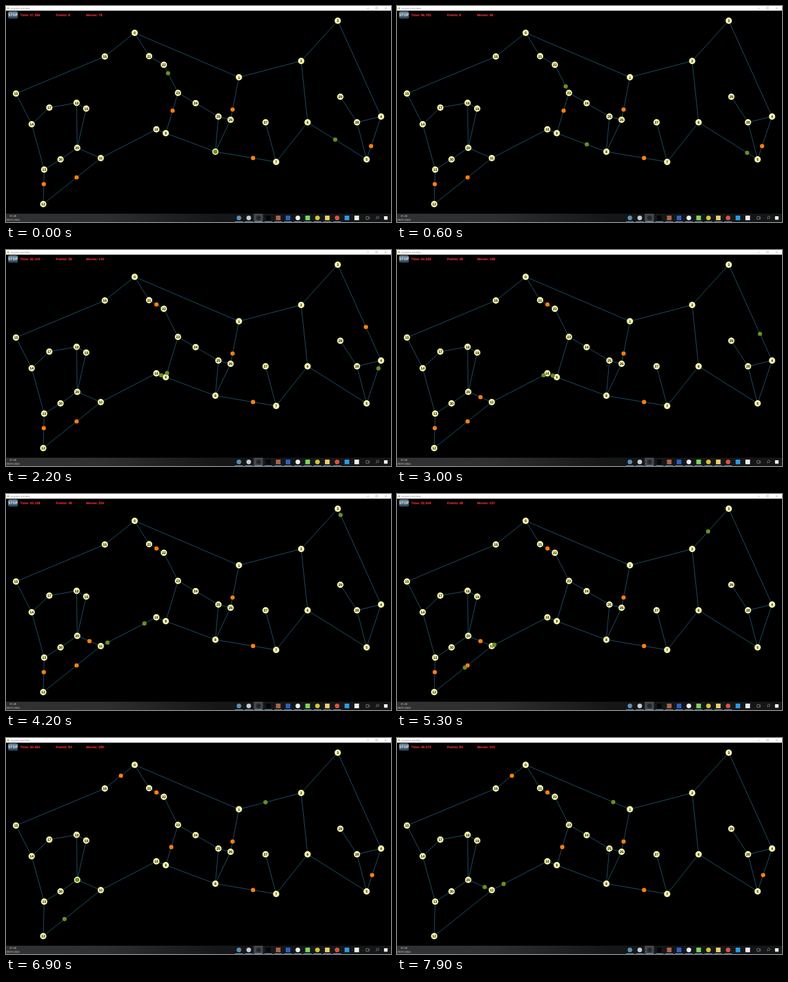
An HTML page that plays this animation: 600x338 px, repeating every 8 s.

```html
<!DOCTYPE html>
<html lang="en">
<head>
<meta charset="utf-8">
<title>Graph game</title>
<style>
  html, body { margin: 0; width: 100%; height: 100%; overflow: hidden; background: #000; }
  svg { display: block; width: 600px; height: 338px; }
  text { text-rendering: geometricPrecision; font-family: Arial, "Liberation Sans", sans-serif; }
  .edge { stroke: #28698a; stroke-width: .75; fill: none; }
  .node { fill: #f9f6ae; }
  .label { font-size: 5.5px; font-weight: bold; text-anchor: middle; fill: #15150c; }
  .score { font-size: 5.2px; font-weight: bold; fill: #f23434; stroke: #f23434; stroke-width: .12; }
  .stop { font: 500 5.8px Roboto, sans-serif; text-anchor: middle; fill: #fff; }
  .item { fill: #ff7f0e; }
  .agent { fill: #6b8e23; }
  .title { font: 4px "Open Sans", sans-serif; fill: #8a8a8a; }
  .date { font: 4px "Open Sans", sans-serif; fill: #e8e8e8; text-anchor: middle; }
  .line { stroke: #aaa; stroke-width: .6; fill: none; }
</style>
</head>
<body>
<svg viewBox="0 0 600 338" xmlns="http://www.w3.org/2000/svg">
  <defs>
    <linearGradient id="steel" x2="0" y2="1">
      <stop offset="0" stop-color="#6d8ba3"/>
      <stop offset="1" stop-color="#2c4257"/>
    </linearGradient>
    <linearGradient id="glass">
      <stop offset="0" stop-color="#303132"/>
      <stop offset=".25" stop-color="#2e2f30"/>
      <stop offset=".55" stop-color="#151617"/>
    </linearGradient>
  </defs>
  <g id="graph"></g>
  <g id="items"></g>
  <g id="agents"></g>

  <rect width="600" height="7.3" fill="#fff"/>
  <circle cx="3.2" cy="3.6" r="1.9" fill="#c9c56a"/>
  <text class="title" x="7" y="5">pygame window</text>
  <path class="line" d="M562.5 3.5h3M576.2 2h2.8v2.8h-2.8zM590.4 2l3 3m0-3l-3 3"/>

  <rect x="3.2" y="8.6" width="15.4" height="11.2" rx="2.5" fill="url(#steel)"/>
  <text class="stop" x="10.9" y="16.2">STOP</text>
  <text class="score" id="time" x="22" y="16"></text>
  <text class="score" id="points" x="78" y="16"></text>
  <text class="score" id="moves" x="125" y="16"></text>

  <rect y="325" width="600" height="13" fill="url(#glass)"/>
  <rect x="386" y="325" width="14.5" height="13" fill="#43474a"/>
  <g id="bar"></g>
  <path class="line" d="M561 329.6h4v4.2h-4zM566.2 329.6v4.2M576.2 333.6l1.6-1.6a1.9 1.9 0 1 1 .4.4"/>
  <rect x="589.2" y="329" width="5.4" height="5.4" fill="#fff"/>
  <text class="date" x="11" y="330.4">01:28</text>
  <text class="date" x="11" y="336.4">05/01/2022</text>
</svg>
<script>
const LOOP = 8000, STEP = 100;
const $ = id => document.getElementById(id);

function add(parent, tag, attrs, text) {
  const el = document.createElementNS("http://www.w3.org/2000/svg", tag);
  for (const key in attrs) el.setAttribute(key, attrs[key]);
  if (text !== undefined) el.textContent = text;
  return $(parent).appendChild(el);
}

const nodes = [
  [200.5, 42], [363, 111.5], [460, 86], [517, 23], [584.5, 173], [562, 240],
  [470, 182], [421, 244], [326.3, 228], [249, 199], [234.3, 193], [147.7, 238],
  [58, 310], [59.5, 256], [40, 185], [15.5, 137], [154, 79], [67.5, 159],
  [110, 151.5], [125, 160.5], [111, 222], [223, 78.5], [246, 92], [268, 136],
  [295.5, 152], [331, 173], [350, 178], [404.5, 182], [547, 182], [521, 142],
  [85, 240]
];

// Chains of node ids joined by edges
const chains = [
  "0 1 2 3 4 5 6 2", "6 7 8 9 10 11 12 13 14 15 16 0 21 22 23 24 25 26 1",
  "23 9", "25 8 26", "7 27", "4 28 5", "28 29", "13 30 20 11",
  "14 17 18 20 19 18"
];

for (const chain of chains)
  add("graph", "polyline", { class: "edge", points: chain.split(" ").map(id => nodes[id]).join(" ") });

nodes.forEach(([x, y], id) => {
  add("graph", "circle", { class: "node", cx: x, cy: y, r: 4.9 });
  add("graph", "text", { class: "label", x, y: y + 2 }, id);
});

// An item, once collected, reappears elsewhere: [ms, edge start, edge end, share of edge]
const items = [
  [[0, 1, 26, .76]],
  [[0, 8, 7, .62]],
  [[0, 23, 9, .44], [1200, 21, 22, .5]],
  [[0, 5, 4, .31], [1200, 3, 4, .65], [2900, 20, 11, .52], [5800, 16, 0, .54]],
  [[0, 12, 13, .58], [6400, 23, 9, .55]],
  [[0, 12, 11, .58], [6500, 5, 4, .38]]
].map(places => ({ places, el: add("items", "circle", { class: "item", r: 3.3 }) }));

// Each agent runs at a steady pace along every edge: [ms at node, node]
const agents = [
  [[-385, 22], [900, 23], [2350, 9], [3880, 10], [5370, 11], [6850, 20], [6900, 20], [8330, 11]],
  [[0, 8], [1520, 9], [2900, 10], [4380, 11], [6350, 12], [6500, 12], [7580, 11], [9080, 10]],
  [[-790, 6], [900, 5], [2490, 4], [4320, 3], [6055, 2], [7530, 1], [9840, 0]]
].map(route => ({ route, el: add("agents", "circle", { class: "agent", r: 3.3 }) }));

// Taskbar apps as plain shapes: c circle, s square
const apps = ("c#5d8fb5 c#c9cdd0 c#24262b s#050505 s#b0614a s#2e5fc4 c#f2f2f2 " +
  "s#7fd65c c#d8c531 s#f3cf67 c#dd5144 s#2b9be8 s#eeeeee").split(" ");

apps.forEach((app, i) => {
  const x = 363 + 15.3 * i, fill = app.slice(1), r = 3.6;
  add("bar", "rect", { x: x - r, y: 331.6 - r, width: 2 * r, height: 2 * r, rx: app[0] === "c" ? r : 0, fill });
  if (i < 11) add("bar", "rect", { x: x - 6, y: 337.2, width: 12, height: .8, fill: "#76b9ed" });
});

function place(el, a, b, share) {
  const [x, y] = nodes[a], [u, v] = nodes[b];
  el.setAttribute("cx", x + (u - x) * share);
  el.setAttribute("cy", y + (v - y) * share);
}

function draw(t) {
  let taken = 0;
  for (const { places, el } of items) {
    const past = places.filter(p => p[0] <= t);
    taken += past.length - 1;
    place(el, ...past.pop().slice(1));
  }
  for (const { route, el } of agents) {
    const next = route.findIndex(stop => stop[0] > t);
    const [t0, a] = route[next - 1], [t1, b] = route[next];
    place(el, a, b, (t - t0) / (t1 - t0));
  }
  $("time").textContent = "Time: " + +(57.296 - .00099 * t).toFixed(3);
  $("points").textContent = "Points: " + (taken ? 12 * (taken + 1) : 8);
  $("moves").textContent = "Moves: " + Math.round(78 + .03 * t);
}

const start = performance.now();
function tick() {
  const t = (performance.now() - start) % LOOP;
  draw(Math.floor(t / STEP) * STEP);
  requestAnimationFrame(tick);
}
tick();
</script>
</body>
</html>
```
